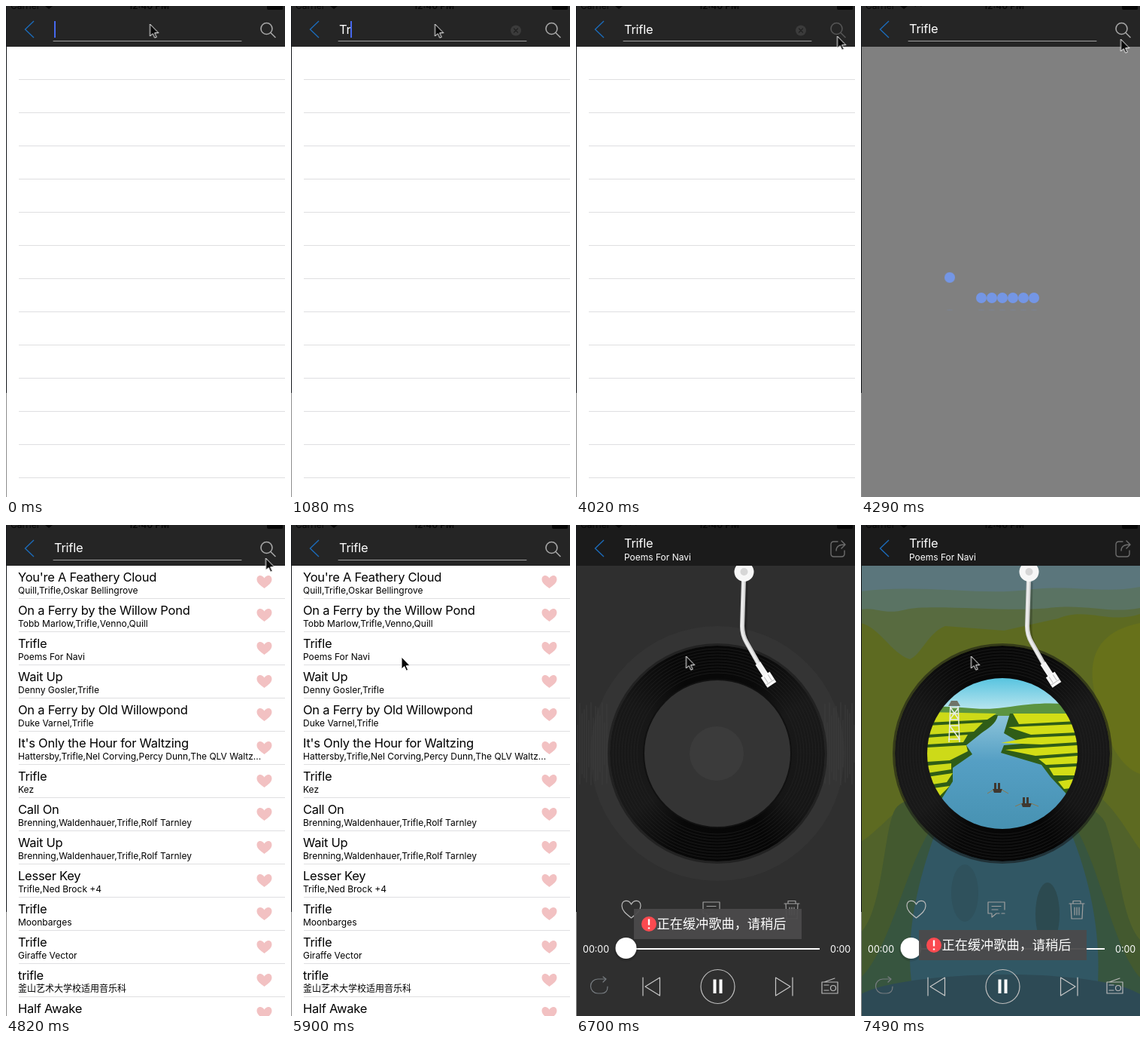
Write an HTML page that moves like this. It is 371 by 651 pixels and loops after 8000 ms.

```html
<!DOCTYPE html>
<html lang="en">
<head>
<meta charset="utf-8">
<title>Music search</title>
<style>
html, body { margin: 0; width: 100%; height: 100%; overflow: hidden; background: #fff; }
#stage { position: relative; width: 371px; height: 651px; overflow: hidden; font-family: Inter, "Noto Sans CJK SC", "Noto Sans CJK", sans-serif; }
svg, .scene { position: absolute; left: 0; top: 0; width: 371px; height: 651px; }
.t { font-size: 16.5px; letter-spacing: -.25px; }
.s { font-size: 12px; }
.line { fill: none; stroke-width: 1.2; stroke-linejoin: round; stroke-linecap: round; }

/* Every state holds until the next one: 1% is 80 ms */
.a { animation: 8s step-end infinite; }
#search { animation-name: search; }
#load { animation-name: load; }
#list { animation-name: list; }
#player { animation-name: player; }
.art { animation-name: art; }
.plain { animation-name: plain; }
#heading { animation-name: heading; }
#popup { animation-name: popup; }
#clear { animation-name: clear; }
#lens { animation-name: lens; }
#busy { animation-name: busy; }
#toast { animation-name: toast; }
#cursor { animation-name: cursor; }
#field { animation-name: field; }
.ball { transform-box: view-box; }
#left { transform-origin: 146px 359px; animation-name: swing-left; }
#right { transform-origin: 230px 359px; animation-name: swing-right; }

@keyframes search { 0% { opacity: 1 } 77%, 100% { opacity: 0 } }
@keyframes load { 0% { opacity: 0 } 53.625% { opacity: 1 } 60.25%, 100% { opacity: 0 } }
@keyframes list { 0% { opacity: 0 } 60.25% { opacity: 1 } 77%, 100% { opacity: 0 } }
@keyframes player { 0% { opacity: 0 } 77%, 100% { opacity: 1 } }
@keyframes heading { 0% { opacity: 0 } 80.375%, 100% { opacity: 1 } }
@keyframes art { 0% { opacity: 0 } 87.125%, 100% { opacity: 1 } }
@keyframes plain { 0% { opacity: 1 } 87.125%, 100% { opacity: 0 } }
@keyframes popup { 0% { opacity: 0 } 20.125% { opacity: 1 } 30.125%, 100% { opacity: 0 } }
@keyframes clear { 0% { opacity: 0 } 6.75% { opacity: 1 } 53.625%, 100% { opacity: 0 } }
@keyframes lens { 0% { stroke: #a6a6a6 } 50.25% { stroke: #555 } 53.625%, 100% { stroke: #a6a6a6 } }
@keyframes busy { 0% { opacity: 0 } 53.625% { opacity: 1 } 60.25% { opacity: 0 } 77% { opacity: 1 } 87.125%, 100% { opacity: 0 } }
@keyframes field { 0% { transform: none } 53.625%, 100% { transform: translateY(-1px) } }
@keyframes swing-left { 0% { transform: rotate(88deg) } 57%, 100% { transform: none } }
@keyframes swing-right { 0% { transform: none } 57%, 100% { transform: rotate(-60deg) } }
@keyframes toast {
  0% { opacity: 0; transform: translateY(498px) }
  80.375% { opacity: 1; transform: translateY(498px) }
  83.75% { opacity: 1; transform: translateY(509px) }
  87.125% { opacity: 1; transform: translateY(518px) }
  90.5% { opacity: 1; transform: translateY(528px) }
  93.625%, 100% { opacity: 1; transform: translateY(537px) }
}
@keyframes cursor {
  0% { transform: translate(191.5px, 24px) }
  46.875% { transform: translate(344px, 48px) }
  50.25% { transform: translate(347.5px, 40px) }
  53.625% { transform: translate(345.5px, 44px) }
  63.625% { transform: translate(335px, 50px) }
  67% { transform: translate(201px, 185px) }
  70.375% { transform: translate(147px, 175px) }
  77%, 100% { transform: translate(146.5px, 174px) }
}

#field { position: absolute; left: 61px; top: 20px; height: 23px; padding-left: 3px; line-height: 23px; color: #fff; white-space: pre; }
#field.marked { background: #1f3449; color: #cfdeed; }
#caret { display: inline-block; width: 2px; height: 22px; margin-right: -2px; background: #4668ee; vertical-align: top; }
#disc { position: absolute; left: 45px; top: 160px; width: 286px; height: 286px; border-radius: 50%;
  background: conic-gradient(#080808, #0a0a0a 28deg, #191919 60deg, #161616 125deg, #060606 150deg, #080808 205deg, #191919 235deg, #171717 300deg, #080808 335deg, #080808);
  box-shadow: 0 0 0 3px rgba(20, 20, 20, .55); }
</style>
</head>
<body>
<div id="stage">
  <svg><path id="rules" stroke="#dfdfe1"/></svg>

  <svg id="load" class="a">
    <path d="M0 54H371V651H0Z" fill="#808080"/>
    <g id="balls" fill="#7496e5"></g>
  </svg>

  <svg id="list" class="a"><path d="M0 54H371V651H0Z" fill="#fff"/></svg>

  <svg><path d="M0 0H371V54H0Z" fill="#252525"/></svg>

  <div id="search" class="scene a">
    <svg class="line">
      <path d="M63 46.5H313" stroke="#a0a0a0" stroke-width="1"/>
      <g id="clear" class="a"><circle cx="299" cy="32.500" r="7" fill="#3b3b3b"/><path d="M296.500 30L301.500 35M301.500 30L296.500 35" stroke="#222"/></g>
      <g id="lens" class="a" stroke-width="1.600"><circle cx="346.500" cy="30" r="7.500"/><path d="M352 35.500L358 41.500"/></g>
    </svg>
    <div id="field" class="a t"><span id="typed"></span><span id="caret"></span></div>
    <svg id="popup" class="a">
      <path d="M61.500 44H109A12 12 0 0 1 109 69.500H61.500Z" fill="#fff" stroke="#b9b9bd"/>
      <text class="t" x="64" y="62.500" fill="#1c6ddd">Drift</text>
      <path d="M104 53L111 60M111 53L104 60" stroke="#b4b4b8" stroke-width="1.200"/>
    </svg>
  </div>

  <div id="player" class="scene a">
    <svg>
      <path d="M0 54H371V651H0Z" fill="#2f2f2f"/>
      <path d="M0 0H371V54H0Z" fill="#1b1b1b"/>
      <g class="a plain"><circle cx="188" cy="303" r="169" fill="#343434"/><path id="waves" stroke="#414141" stroke-width=".8"/></g>
      <g class="a art">
        <path d="M0 54H371V651H0Z" fill="#5d6a21"/>
        <path d="M0 54H371V118C330 132 300 108 262 124L190 140L112 134C90 142 80 172 65 178C40 170 25 136 0 130Z" fill="#586b40"/>
        <path d="M0 54H371V110C330 118 300 104 250 110S90 104 60 112S20 108 0 112Z" fill="#5a7363"/>
        <path d="M0 54H371V82C320 92 280 78 220 86S80 78 0 88Z" fill="#5b767c"/>
        <path d="M371 130C320 140 300 170 310 220S340 320 371 330Z" fill="#67711a"/>
        <path d="M0 420C35 400 60 340 188 330S335 380 371 430V651H0Z" fill="#51622a"/>
        <path d="M0 540C30 510 30 400 46 376C70 340 300 340 325 395C345 450 345 520 371 550V651H0Z" fill="#43592f"/>
        <path d="M0 600C40 560 60 450 95 400H285C320 460 335 560 371 600V651H0Z" fill="#37553f"/>
        <path d="M78 651C48 570 76 470 100 405H278C305 470 326 560 310 651Z" fill="#315764"/>
        <path d="M0 622C60 590 310 585 371 622V651H0Z" fill="#2d4a55"/>
        <ellipse cx="138" cy="488" rx="18" ry="38" fill="#2f515c"/>
        <ellipse cx="248" cy="516" rx="16" ry="42" fill="#2c4a50"/>
      </g>
    </svg>
    <div id="disc"></div>
    <svg>
      <defs>
        <clipPath id="round"><circle cx="188" cy="303" r="100"/></clipPath>
        <linearGradient id="sky" x2="0" y2="1"><stop stop-color="#58c4e0"/><stop offset="1" stop-color="#c4e9f0"/></linearGradient>
        <linearGradient id="river" x2="0" y2="1"><stop stop-color="#8cc4da"/><stop offset=".4" stop-color="#559fc4"/><stop offset="1" stop-color="#4792b2"/></linearGradient>
      </defs>
      <g id="grooves" fill="none" stroke="#262626" stroke-width=".6"></g>
      <g class="a plain"><circle cx="188" cy="303" r="98" fill="#343434" stroke="#111" stroke-width="2"/><circle cx="187" cy="303" r="36" fill="#3b3b3b"/></g>
      <g class="a art" clip-path="url(#round)">
        <path d="M88 203H288V250H88Z" fill="url(#sky)"/>
        <path d="M88 243C120 236 150 248 190 242S260 234 288 240V262H88Z" fill="#5c9441"/>
        <path d="M88 253H288V403H88Z" fill="url(#river)"/>
        <path d="M88 250L182 252C180 264 168 270 160 276L140 292L148 304L122 322V340L104 368L88 370Z" fill="#2f5d17"/>
        <path d="M88 248L180 250L168 258L88 262ZM88 266L162 262L150 274L88 278ZM88 282L142 278L136 288L88 291ZM88 295L140 292L142 300L118 312L88 314ZM88 319L120 316V324L88 329ZM88 334L122 329L114 341L88 345ZM88 350L118 346L100 364H88Z" fill="#cdda18"/>
        <path d="M198 250H288V400L282 366L252 334L240 318L186 302L190 292L214 290L190 276Z" fill="#2f5d17"/>
        <path d="M202 250H288V260L210 264ZM196 268L288 264V275L226 278ZM222 282L288 279V288L240 291L186 289ZM192 298L288 292V302L232 306ZM236 310L288 306V316L246 318ZM250 322L288 320V332L256 332ZM262 340L288 336V348L270 350Z" fill="#d3de16"/>
        <path d="M118 242H130M118 250H130M118 258H130M117 266H131M117 274H131M116 284H132M119 235L117 288M129 235L131 288M119 242L130 258M130 242L118 258M118 266L131 284" stroke="#e6ece6" stroke-width="1.500"/>
        <path d="M116 240L120 233H128L132 240Z" fill="#6f7468"/>
        <path d="M175 350H188L186 355H177ZM213 369H227L225 374H215ZM177 342H180V350H177ZM182 342H185V350H182ZM215 361H218V369H215ZM220 361H223V369H220Z" fill="#3f3830"/>
        <path d="M168 356L176 351M187 351L196 356M205 373L214 369M226 369L236 373" stroke="#8a7750"/>
      </g>

      <g stroke-linejoin="round">
        <path d="M226 76L225 138Q225 150 230 159L246 188" fill="none" stroke="#000" stroke-opacity=".2" stroke-width="5"/>
        <path d="M223 72L221 134Q221 146 227 156L244 186" fill="none" stroke="#cfcfcf" stroke-width="6"/>
        <path d="M222.500 72L220.500 134Q220.500 146 226.500 156L243.500 186" fill="none" stroke="#ededed" stroke-width="3"/>
        <path d="M213.300 54H233.700A13 13 0 1 1 213.300 54Z" fill="#f7f7f7"/>
        <circle cx="223.500" cy="62" r="5" fill="#d6d6d6"/>
        <g transform="translate(243 185) rotate(-33)"><path d="M-4-2H4V18H-4Z" fill="#f4f4f4"/><path d="M-7 16H7V32H-7Z" fill="#fafafa"/><path d="M-3 18V27M3 18V27M-7 28H7" stroke="#bbb"/></g>
      </g>

      <g class="line" stroke="#a0a0a0">
        <path d="M73.500 521C66 515 61 511 61 505C61 497 70 496 73.500 503C77 496 86 497 86 505C86 511 81 515 73.500 521Z" stroke="#bcbcbc"/>
        <path d="M191 510V500H169V515H174V520L180 515H184M174 505.500H186M174 510H182M187 515H191"/>
        <path d="M277 502H297M282 502V498.500H292V502M279 502L280 522H294L295 502M284 507V517M287 507V517M290 507V517"/>
        <path d="M38 602H29A9.500 9.500 0 0 0 29 621H34Q42 621 42 612M36 599L40 602L36 606" stroke="#777c80"/>
        <path d="M89 600V624M111.500 600L92 612L111.500 624Z" stroke="#c8c8c8"/>
        <path d="M288 600V624M265.500 600L285 612L265.500 624Z" stroke="#c8c8c8"/>
        <path d="M327 606H348V621H327ZM330 606L344 601M330 610H336M330 617H336" stroke="#bbb"/>
        <circle cx="342" cy="614" r="3.500" stroke="#bbb"/>
        <circle cx="188.500" cy="612" r="22.500" stroke="#bdbdbd"/>
        <path d="M348 22H343Q339 22 339 26V38Q339 42 343 42H353Q357 42 357 38V34M346 34Q346 26 357 26M353 21L358 26L353 31" stroke="#6c6c6c" stroke-width="1.400"/>
      </g>
      <path d="M182.500 602.500H186.500V621H182.500ZM190.500 602.500H194.500V621H190.500ZM66 561H324V563H66Z" fill="#fff"/>
      <circle cx="66.500" cy="562.500" r="16" fill="#000" opacity=".12"/>
      <circle cx="66.500" cy="561" r="14" fill="#fff"/>
      <g fill="#fff" font-size="12.500"><text x="9" y="566.500">00:00</text><text x="338" y="566.500">0:00</text></g>
      <g id="heading" class="a" fill="#fff"><text class="t" x="64" y="30">Trifle</text><text class="s" x="64" y="46.500">Poems For Navi</text></g>
      <g id="toast" class="a">
        <path d="M77 0H300V40H77Z" fill="#4b4a4b" fill-opacity=".95"/>
        <circle cx="97" cy="20" r="10" fill="#fb4a50"/>
        <path d="M97 13.500V21.500M97 24.500V26.500" stroke="#fff" stroke-width="2.400"/>
        <text x="107.500" y="26.300" font-size="17.200" fill="#fff" lang="zh-CN" font-family="Noto Sans CJK SC, Noto Sans CJK, sans-serif">正在缓冲歌曲，请稍后</text>
      </g>
    </svg>
  </div>

  <svg>
    <g fill="#070707"><text class="s" x="6" y="4">Carrier</text><text x="190" y="4" font-size="12" font-weight="600" text-anchor="middle">12:40 PM</text><path d="M347 0H368V4Q368 5 366 5H349Q347 5 347 3ZM52 0H62L57 4Z"/></g>
    <path id="busy" class="a" d="M72 1A4 4 0 0 1 80 1" fill="none" stroke="#090909"/>
    <path d="M37 20L25.500 31L37 42" fill="none" stroke="#1c6bb9" stroke-width="1.400"/>
    <path d="M0 0H1V513H0Z" fill="#14171b"/><path d="M0 513H1V651H0Z" fill="#8d8d8d"/>
    <path id="cursor" class="a" d="M0 0V16L3.700 12.600L6.300 18.200L8.700 17.200L6.200 11.700H11.300Z" fill="#080808" stroke="#fff"/>
  </svg>
</div>

<script>
const $ = id => document.getElementById(id);
const range = n => [...Array(n).keys()];

function add(parent, tag, attrs, text = "") {
  const el = document.createElementNS("http://www.w3.org/2000/svg", tag);
  for (const key in attrs) el.setAttribute(key, attrs[key]);
  el.textContent = text;
  parent.append(el);
}

const songs = [
  ["You're A Feathery Cloud", "Quill,Trifle,Oskar Bellingrove"],
  ["On a Ferry by the Willow Pond", "Tobb Marlow,Trifle,Venno,Quill"],
  ["Trifle", "Poems For Navi"],
  ["Wait Up", "Denny Gosler,Trifle"],
  ["On a Ferry by Old Willowpond", "Duke Varnel,Trifle"],
  ["It's Only the Hour for Waltzing", "Hattersby,Trifle,Nel Corving,Percy Dunn,The QLV Waltz..."],
  ["Trifle", "Kez"],
  ["Call On", "Brenning,Waldenhauer,Trifle,Rolf Tarnley"],
  ["Wait Up", "Brenning,Waldenhauer,Trifle,Rolf Tarnley"],
  ["Lesser Key", "Trifle,Ned Brock +4"],
  ["Trifle", "Moonbarges"],
  ["Trifle", "Giraffe Vector"],
  ["trifle", "釜山艺术大学校适用音乐科"],
  ["Half Awake", ""]
];
const heart = "c-5-4-10-7-10-12c0-6 7-7 10-1.500c3-5.500 10-4.500 10 1.500c0 5-5 8-10 12z";
const rules = range(13).map(i => `M17 ${97.5 + 44 * i}H371`).join("");
$("rules").setAttribute("d", rules);
add($("list"), "path", { d: rules, stroke: "#dfdfe1" });
songs.forEach(([title, artist], i) => {
  const y = 54 + 44 * i;
  add($("list"), "text", { class: "t", x: 16, y: y + 21 }, title);
  add($("list"), "text", { class: "s", x: 16, y: y + 37 }, artist);
  add($("list"), "path", { d: `M343.500 ${y + 30}${heart}`, fill: "#f2c1c2" });
});

range(7).forEach(i => {
  const id = i == 0 ? "left" : i == 6 ? "right" : "ball" + i;
  add($("balls"), "circle", { id, class: i % 6 ? "ball" : "ball a", cx: 146 + 14 * i, cy: 387, r: 7 });
  add($("balls"), "ellipse", { cx: i ? 146 + 14 * i : 118, cy: 403, rx: 4, ry: 1, opacity: .12 });
});

range(9).forEach(i => add($("grooves"), "circle", { cx: 188, cy: 303, r: 107 + 4 * i }));
$("waves").setAttribute("d", range(14).map(i => {
  const h = 25 + 30 * Math.abs(Math.sin(i * 1.3));
  const x = 2 + i * 3;
  return `M${x} ${290 - h}V${290 + h}M${372 - x} ${290 - h}V${290 + h}`;
}).join(""));

// [start in ms, text, caret shown]
const typing = [
  [0, "", 1], [270, "", 0], [540, "T", 1], [810, "Tr", 1], [1080, "Tri", 1], [1340, "Trif", 1],
  [1610, "Trifh", 1], [1870, "Trifh", 0], [2140, "Trifh", 1], [2410, "Trif", 1],
  [2950, "Trifl", 1], [3220, "Trifle", 1], [3490, "Trifle", 0]
];
const clock = $("cursor").getAnimations()[0];

function draw() {
  const now = (clock && clock.currentTime != null ? clock.currentTime : performance.now()) % 8000;
  const [, text, caret] = typing.filter(step => step[0] <= now + .5).pop();
  $("typed").textContent = text;
  $("caret").style.opacity = caret;
  $("field").className = text == "Trifh" ? "a t marked" : "a t";
  requestAnimationFrame(draw);
}
draw();
</script>
</body>
</html>
```
